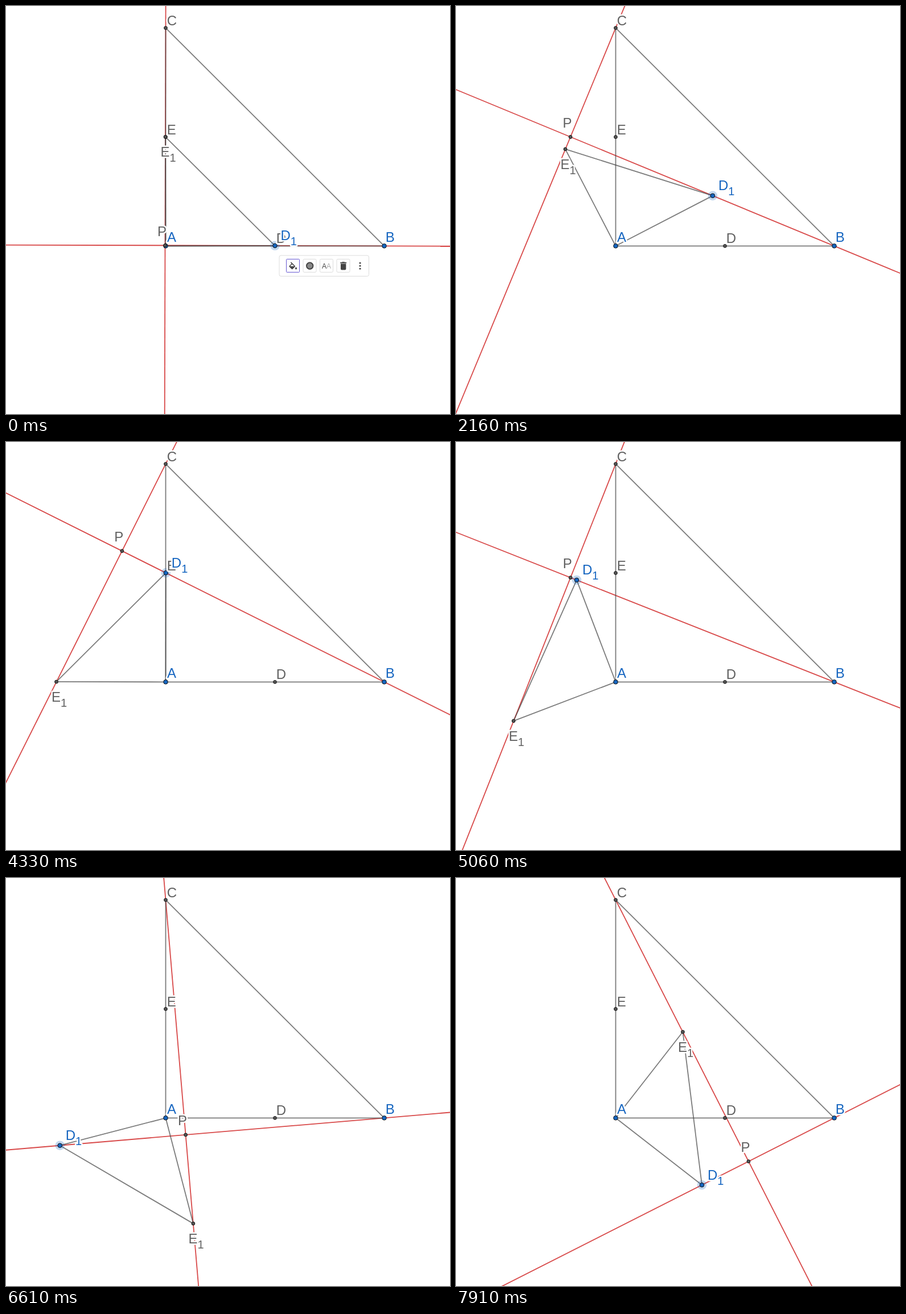
An HTML page that plays this animation: 780x718 px, repeating every 8000 ms.

```html
<!DOCTYPE html>
<html lang="en">
<head>
<meta charset="utf-8">
<title>Rotating triangle</title>
<style>
  html, body { margin: 0; width: 100%; height: 100%; overflow: hidden; background: #fff; }
  svg { display: block; }
  .red { stroke: #d32f2f; stroke-opacity: .87; stroke-width: 1.8; }
  .seg { stroke: #444; stroke-opacity: .7; stroke-width: 1.8; }
  .dot { stroke: #111; stroke-width: 1; }
  .label { font: 24px "Liberation Sans", Arial, sans-serif; stroke: #fff; stroke-width: 5;
           stroke-linejoin: round; paint-order: stroke; }
  .sub { font-size: 20px; }
  .btn { fill: #fff; stroke: #dcdcdc; }
  .aa { font: 12px "Liberation Sans", Arial, sans-serif; }
</style>
</head>
<body>
<svg width="780" height="718" viewBox="0 0 780 718">
  <g id="scene"></g>
  <g id="bar" fill="#444">
    <rect x="480" y="439" width="157.5" height="36.5" rx="3" fill="#fff" stroke="#dcdcdc"/>
    <rect class="btn" x="492.5" y="445.5" width="23" height="23" rx="1" style="stroke:#6557d2"/>
    <rect class="btn" x="522" y="445.5" width="23" height="23" rx="2"/>
    <rect class="btn" x="551.5" y="445.5" width="23" height="23" rx="2"/>
    <rect class="btn" x="581" y="445.5" width="23" height="23" rx="2"/>
    <path transform="translate(495.1 450.5) scale(.76)" d="M16.56 8.94L7.62 0 6.21 1.41l2.38 2.38-5.15 5.15c-.59.59-.59 1.54 0 2.12l5.5 5.5c.29.29.68.44 1.06.44s.77-.15 1.06-.44l5.5-5.5c.59-.58.59-1.53 0-2.12zM5.21 10L10 5.21 14.79 10H5.21zM19 11.5s-2 2.17-2 3.5c0 1.1.9 2 2 2s2-.9 2-2c0-1.33-2-3.5-2-3.5z"/>
    <circle cx="533.7" cy="457.3" r="5.7" fill="#888" stroke="#444" stroke-width="2"/>
    <text class="aa" x="555" y="461.5">A<tspan fill="#aaa">A</tspan></text>
    <path transform="translate(583.3 448) scale(.78)" d="M6 19c0 1.1.9 2 2 2h8c1.1 0 2-.9 2-2V7H6v12zM19 4h-3.5l-1-1h-5l-1 1H5v2h14V4z"/>
    <circle cx="622" cy="452.3" r="1.5"/><circle cx="622" cy="457.3" r="1.5"/><circle cx="622" cy="462.3" r="1.5"/>
  </g>
</svg>
<script>
const LOOP = 8000, START = 730, R = 192;
const BLUE = '#1565c0', GRAY = '#616161';
const A = [280.5, 422.3], B = [664.5, 422.3], C = [280.5, 38.6], D = [472.5, 422.3], E = [280.5, 230.5];
const scene = document.getElementById('scene'), bar = document.getElementById('bar');

// [time, even steps since the previous entry]
const beats = [[0, 0], [730, 1], [1310, 5], [1570, 2], [2270, 6], [2400, 1], [2750, 3], [2890, 1],
  [3120, 2], [3230, 1], [3600, 3], [3720, 1], [4330, 5], [4580, 2], [5060, 4], [5210, 1],
  [6010, 7], [6140, 1], [6610, 4], [6840, 2], [6970, 1], [7690, 6], [7820, 1], [7910, 1], [LOOP, 1]];

// [time, rotation in degrees]
const keys = [[610, .15], [1310, 11.57], [2270, 30], [2750, 41.7], [3120, 50.5], [4330, 89.9],
  [4460, 94], [5060, 110.9], [6610, 194.6], [7910, 322.1]];

function snap(t) {
  const i = beats.findIndex(b => b[0] > t);
  const from = beats[i - 1][0], step = (beats[i][0] - from) / beats[i][1];
  return from + Math.floor((t - from) / step + 1e-6) * step;
}

const rate = (i, j) => (keys[j][1] - keys[i][1]) / (keys[j][0] - keys[i][0]);

// Slope at a key from the parabola through its neighbours
function slope(i) {
  const last = keys.length - 1;
  if (i === 0) return rate(0, 1);
  if (i === last) return 2 * rate(last - 1, last) - slope(last - 1);
  const before = keys[i][0] - keys[i - 1][0], after = keys[i + 1][0] - keys[i][0];
  return (rate(i - 1, i) * after + rate(i, i + 1) * before) / (before + after);
}

function angle(t) {
  if (t < START) return keys[0][1];
  let i = 0;
  while (i < keys.length - 2 && t >= keys[i + 1][0]) i++;
  const [t0, a] = keys[i], [t1, b] = keys[i + 1], h = t1 - t0, u = (t - t0) / h, v = 1 - u;
  return v * v * (1 + 2 * u) * a + u * u * (1 + 2 * v) * b + h * u * v * (v * slope(i) - u * slope(i + 1));
}

const line = (p, q, cls) => `<line class="${cls}" x1="${p[0]}" y1="${p[1]}" x2="${q[0]}" y2="${q[1]}"/>`;
const seg = (p, q) => line(p, q, 'seg');
const dot = ([x, y], r, fill) => `<circle class="dot" cx="${x}" cy="${y}" r="${r}" fill="${fill}"/>`;
const dark = p => dot(p, 2.9, '#555');
const blue = p => dot(p, 3.8, BLUE);

function ray(p, [ux, uy]) {
  const far = 2000;
  return line([p[0] - ux * far, p[1] - uy * far], [p[0] + ux * far, p[1] + uy * far], 'red');
}

function label(name, [x, y], dx, dy, color) {
  const sub = name[1] ? `<tspan class="sub" dy="9">${name[1]}</tspan>` : '';
  return `<text class="label" x="${x + dx}" y="${y + dy}" fill="${color}">${name[0]}${sub}</text>`;
}

function draw(t) {
  const a = angle(t) * Math.PI / 180, c = R * Math.cos(a), s = R * Math.sin(a);
  const D1 = [A[0] + c, A[1] - s], E1 = [A[0] - s, A[1] - c];
  const len = Math.hypot(D1[0] - B[0], D1[1] - B[1]);
  const u = [(D1[0] - B[0]) / len, (D1[1] - B[1]) / len];
  const k = (C[0] - B[0]) * u[0] + (C[1] - B[1]) * u[1];
  const P = [B[0] + u[0] * k, B[1] + u[1] * k];

  scene.innerHTML = ray(B, u) + ray(C, [-u[1], u[0]]) +
    seg(A, B) + seg(B, C) + seg(C, A) + seg(A, D1) + seg(D1, E1) + seg(E1, A) +
    blue(A) + blue(B) + [C, D, E, E1, P].map(dark).join('') +
    `<circle cx="${D1[0]}" cy="${D1[1]}" r="8.3" fill="${BLUE}" fill-opacity=".25"/>` + blue(D1) +
    label('A', A, 2.5, -7, BLUE) + label('B', B, 2.3, -7, BLUE) + label('C', C, 2.3, -5, GRAY) +
    label('D', D, 2.3, -5, GRAY) + label('E', E, 2.3, -5, GRAY) + label('E1', E1, -8.5, 35, GRAY) +
    label('P', P, -13.5, -16.5, GRAY) + label('D1', D1, 10, -9.5, BLUE);
  bar.style.display = t < START ? '' : 'none';
}

const begin = performance.now();
let shown = -1;
function tick() {
  const t = snap((performance.now() - begin) % LOOP);
  if (t !== shown) draw(shown = t);
  requestAnimationFrame(tick);
}
tick();
</script>
</body>
</html>
```
